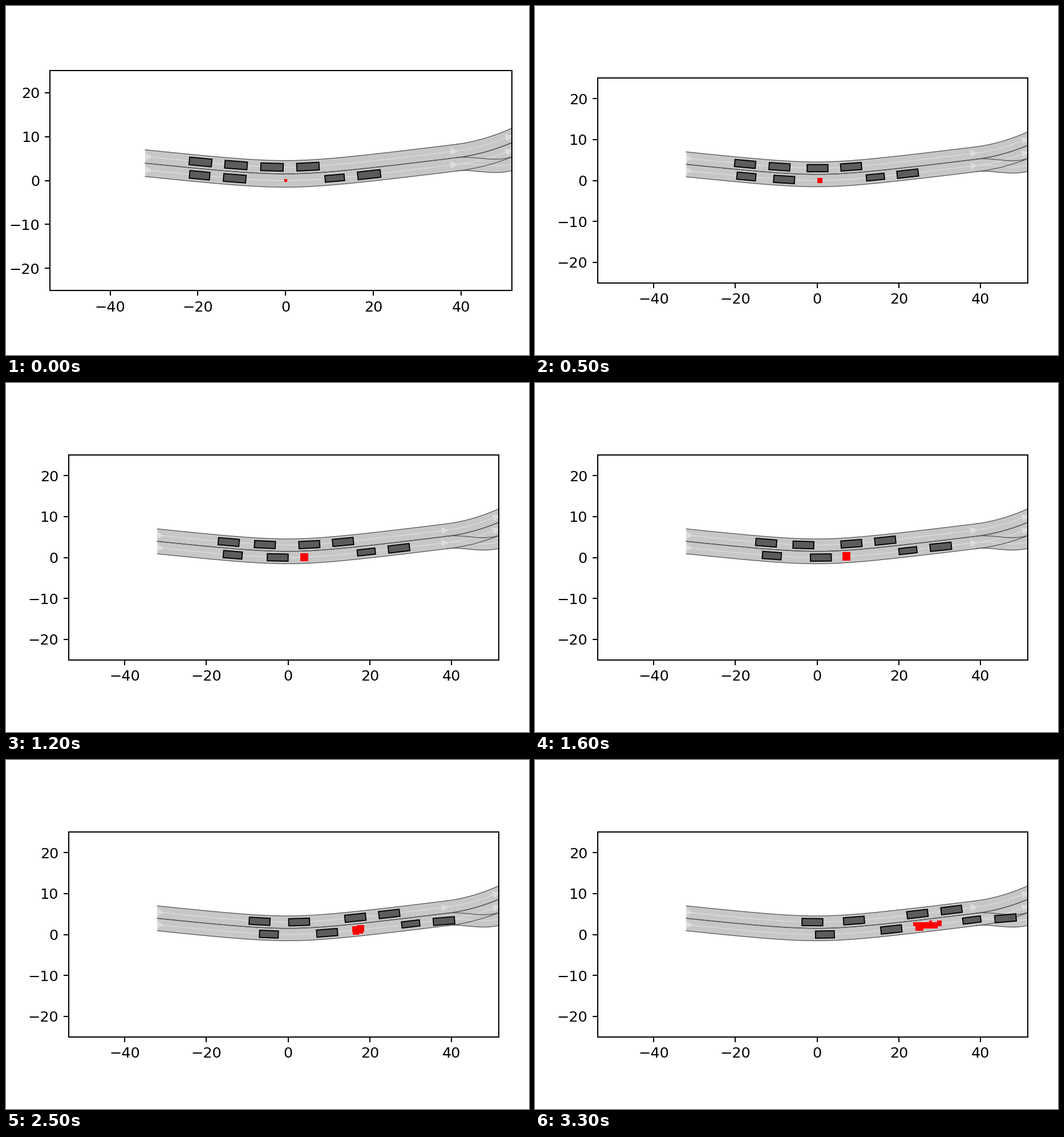
Animation, 917 px wide and 611 px high, one loop 3.4 s. Source, as a matplotlib script:

```python
import numpy as np
import matplotlib.pyplot as plt
from matplotlib.animation import FuncAnimation
from matplotlib.collections import PolyCollection
from matplotlib.patches import Polygon

W, H, DPI = 917, 611, 183.4
FRAMES, INTERVAL = 34, 100
XLIM, YLIM = (-53.7, 51.6), (-25, 25)
START, FORK, END = -32, 39, 52
LANE = 3.03
ROAD, BORDER, GUIDE = "#c7c7c7", "#555555", "#dddddd"

fig = plt.figure(figsize=(W / DPI, H / DPI), dpi=DPI, facecolor="white")
ax = fig.add_axes([0.1, 0.2, 0.8, 0.6])
ax.set(xlim=XLIM, ylim=YLIM, xticks=range(-40, 41, 20), yticks=range(-20, 21, 10))


def place_axes(cx, scale):
    """Put the data origin at pixel column cx, with scale pixels per unit."""
    ax.set_position([(cx + XLIM[0] * scale) / W, 0.5 + YLIM[0] * scale / H,
                     (XLIM[1] - XLIM[0]) * scale / W, (YLIM[1] - YLIM[0]) * scale / H])


def rotate(points, angle):
    c, s = np.cos(angle), np.sin(angle)
    return np.asarray(points) @ np.array([[c, s], [-s, c]])


def divider(x):
    """Line between the two lanes: a shallow bend that steepens past the fork."""
    bend = np.hypot(x, 12) - 12
    return (1.5 + np.where(x < 0, 0.1105, 0.1285) * bend
            + 0.0117 * np.maximum(x - FORK, 0) ** 2)


# the exit swings away from the road through four points
exit_line = np.poly1d(np.polyfit([FORK, 41, 47.7, END], [3.72, 3.79, 3.33, 3.94], 3))


def slope(line, x, d=2.5):
    return (line(x + d) - line(x - d)) / (2 * d)


def shifted(line, offset):
    """The curve running beside line at the given distance."""
    return lambda x: line(x) + offset * np.hypot(1, slope(line, x, 0.1))


upper, lower = shifted(divider, LANE / 2), shifted(divider, -LANE / 2)


def leaving(x):
    return np.minimum(lower(x), 2.6 + 0.084 * (x - 30))


def draw_lane(line, x0, x1):
    x = np.linspace(x0, x1, 24)
    low, high = shifted(line, -LANE / 2)(x), shifted(line, LANE / 2)(x)
    ax.fill_between(x, low, high, fc=ROAD, ec="none", lw=0, zorder=1)
    ax.plot(x, line(x), color=GUIDE, lw=0.5, zorder=1.2)
    for y in (low, high):
        ax.plot(x, y, color=BORDER, lw=0.5, zorder=1.3)


for lane in (upper, lower):
    draw_lane(lane, START, FORK)
    draw_lane(lane, FORK, END)
    for x in (START, FORK - 1.4, END - 1.8):
        arrow = rotate([(0, 0.87), (1.65, 0), (0, -0.87)], np.arctan(slope(lane, x, 1)))
        ax.add_patch(Polygon(arrow + (x, lane(x)), fc=GUIDE, ec="none", zorder=1.25))
draw_lane(exit_line, FORK, END)

# Vehicles: lane, start, speed per frame, length, width
ACCEL = 0.007
CARS = [
    (upper, -19.4, 0.322, 5.1, 1.75),
    (upper, -11.3, 0.385, 5.1, 1.75),
    (upper, -3.1, 0.607, 5.1, 1.75),
    (upper, 5.1, 0.611, 5.1, 1.75),
    (lower, -19.6, 0.421, 4.6, 1.75),
    (lower, -11.6, 0.671, 5.1, 1.75),
    (lower, 11.2, 0.577, 4.4, 1.5),
    (leaving, 19.05, 0.589, 5.2, 1.75),
]
CORNERS = np.array([(-1, -1), (1, -1), (1, 1), (-1, 1)])


def car_shape(lane, start, speed, length, width, t):
    x = start + speed * t + ACCEL * t * t
    box = CORNERS * (length / 2, width / 2)
    return rotate(box, np.arctan(slope(lane, x))) + (x, lane(x))


cars = [ax.add_patch(Polygon(CORNERS, fc="#5c5c5c", ec="black", lw=0.75, zorder=2))
        for _ in CARS]

# Reachable area: one block that later frays into these boxes (x0, y0, x1, y1)
BLOCK = np.array([-0.5, -1, 0.5, 1])
FRAYED = np.array([
    (-0.43, -0.8, 0.36, 0.8),
    (0.33, -0.2, 0.5, 1.2),
    (-0.43, -1.3, -0.14, 0),
    (-0.5, -0.25, -0.3, 0.8),
    (0.06, 0.5, 0.16, 1.2),
])
area = ax.add_collection(PolyCollection([], fc="red", ec="none", lw=0, zorder=2.2),
                         autolim=False)


def area_boxes(t):
    x = t * t * (0.0282 - 0.000015 * (t - 18) ** 2)
    grow = np.clip((t - 2) / 6, 0, 1)
    grow = grow * grow * (3 - 2 * grow)
    spread = max(t - 18, 0) / 15
    width = 0.66 + 1.24 * grow + 5.1 * spread ** 2
    height = 0.33 + 0.7 * grow
    boxes = BLOCK + np.sqrt(spread) * (FRAYED - BLOCK)
    boxes = boxes * [width, height, width, height] + np.tile([x, lower(x)], 2)
    return [[(a, b), (c, b), (c, d), (a, d)] for a, b, c, d in boxes]


def update(i):
    # the first layout is slightly larger than the settled one
    place_axes(*((490.2, 7.69) if i == 0 else (494.6, 7.165)))
    for patch, car in zip(cars, CARS):
        patch.set_xy(car_shape(*car, i))
    area.set_verts(area_boxes(i))
    return [*cars, area]


anim = FuncAnimation(fig, update, frames=FRAMES, interval=INTERVAL, repeat=True,
                     repeat_delay=0, blit=False)
plt.show()
```
